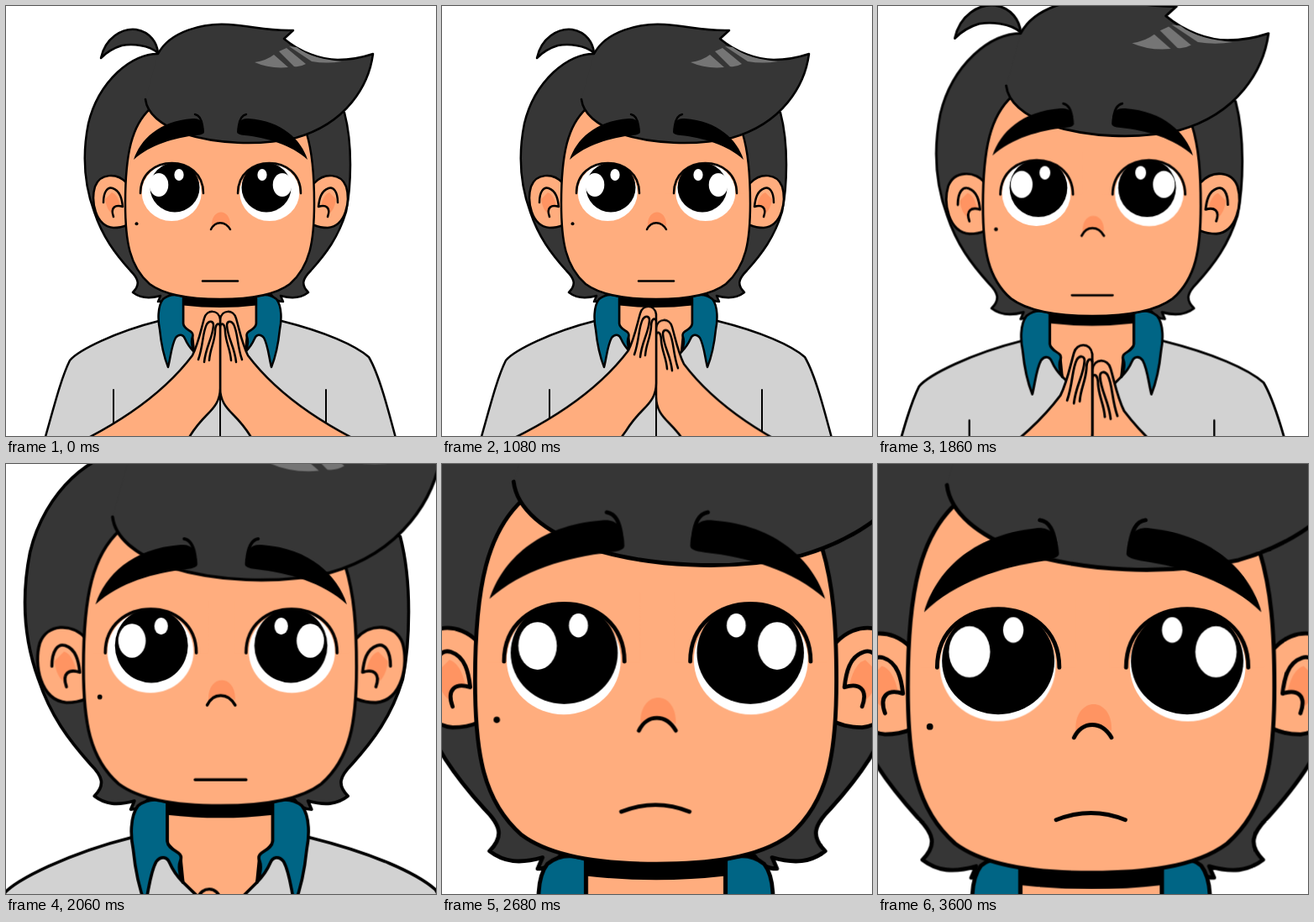
An HTML page without scripts for the animation above (3.62 s loop, 512 px wide and 512 px high).

```html
<!DOCTYPE html>
<html lang="en">
<head>
<meta charset="utf-8">
<title>Pleading</title>
<style>
html, body { margin: 0; width: 100%; height: 100%; overflow: hidden; background: #fff; }
svg { display: block; width: 100%; height: 100%; }
.ink { stroke: #000; stroke-width: 2.5; stroke-linecap: round; stroke-linejoin: round; }
.line { fill: none; }
.skin { fill: #ffad7e; }
.blush { fill: #ff9462; }
.hair { fill: #363636; }
.shirt { fill: #d2d2d2; }
.teal { fill: #006585; }
.shine { fill: #757575; }
.white { fill: #fff; }

.zoom, .nod, .lid, .lash, .brow, .pupil, .glint, .mouth, .rub, .drop {
  animation: 3620ms ease-in-out infinite;
}
.zoom { animation-name: zoom; }
.nod { animation-name: nod; }
.lid { animation-name: lid; }
.lash { animation-name: lash; }
.brow { animation-name: brow; transform-origin: 152px 183px; }
.pupil { animation-name: pupil; transform-origin: 201px 216px; }
.glint { animation-name: glint; transform-origin: 200px 210px; }
.mouth { animation-name: mouth; }
.rub { animation-name: rub; }
.drop { animation-name: drop; }
.left { --rub: -14px; }
.right { --rub: 24px; }

@keyframes zoom {
  0%, 45.3% { transform: translate(0, 0) scale(1); animation-timing-function: ease-in; }
  56.9% { transform: translate(-112.5px, -97px) scale(1.443); animation-timing-function: ease-out; }
  70.2% { transform: translate(-231px, -190px) scale(1.908); animation-timing-function: linear; }
  99.4%, 100% { transform: translate(-240px, -199px) scale(1.94); }
}
@keyframes nod {
  0%, 15.4%, 29.8%, 53%, 74% { transform: translateY(0); }
  7%, 40%, 43.8% { transform: translateY(5px); }
  92%, 100% { transform: translateY(4.5px); }
}
/* The lid is the skin above the eye opening, the lash its lower edge. */
@keyframes lid {
  0%, 18.8%, 29.8%, 53%, 100% { d: path("M150 223L160 223C160 175 235 175 235 223L245 223L245 180L150 180Z"); }
  8.8%, 40%, 43.8% { d: path("M150 230L160 230C171 194 224 194 235 230L245 230L245 180L150 180Z"); }
}
@keyframes lash {
  0%, 18.8%, 29.8%, 53%, 100% { d: path("M160 223C160 175 235 175 235 223"); }
  8.8%, 40%, 43.8% { d: path("M160 230C171 194 224 194 235 230"); }
}
@keyframes brow {
  0%, 18.8%, 29.8%, 53% { transform: translate(0, 0) rotate(0deg); }
  8.8%, 40%, 43.8% { transform: translate(-1px, 4px) rotate(3deg); }
  74% { transform: translate(-1px, 1px) rotate(0deg); }
  92%, 100% { transform: translate(0, 6px) rotate(-2deg); }
}
@keyframes pupil {
  0%, 45.3% { transform: translate(0, 0) scale(1, 1); }
  56.9% { transform: translate(-3px, 1px) scale(1.02, 1.04); }
  74% { transform: translate(-3.5px, 1.5px) scale(1.13, 1.08); }
  99.4%, 100% { transform: translate(-3.5px, 3px) scale(1.17, 1.11); }
}
@keyframes glint {
  0%, 56.9% { transform: scale(1); }
  74% { transform: scale(1.06); }
  99.4%, 100% { transform: scale(1.12); }
}
@keyframes mouth {
  0%, 56.9% { d: path("M234 327.5Q255 327.5 276 327.5"); }
  71%, 100% { d: path("M233 316.5Q254.5 308 275.5 316.5"); }
}
@keyframes rub {
  0%, 10.77%, 21.55%, 32.32%, 43.09%, 53.87%, 100% { transform: translateY(0); }
  5.39%, 16.16%, 26.93%, 37.71%, 48.48%, 59.25% { transform: translateY(var(--rub)); }
}
@keyframes drop {
  0%, 45.3% { transform: translateY(0); animation-timing-function: ease-in; }
  56.9% { transform: translateY(62px); animation-timing-function: linear; }
  66%, 100% { transform: translateY(190px); }
}
</style>
</head>
<body>
<svg viewBox="0 0 512 512" preserveAspectRatio="none">
  <defs>
    <ellipse id="eyeball" class="white" cx="197.2" cy="222" rx="35.500" ry="34"/>

    <g id="glints" class="white">
      <ellipse cx="182" cy="213" rx="11.3" ry="14"/>
      <ellipse cx="206" cy="201" rx="5.6" ry="7"/>
    </g>

    <g id="eyebrow">
      <path d="M152 183C160 159 182 137 222 134C231 133 236 138 236 150Q236 153 227 154C200 157 172 165 152 183Z"/>
      <path class="ink line" d="M225 129C231 130 233 136 234 143"/>
    </g>

    <g id="ear">
      <path class="ink skin" d="M144 211C132 198 112 199 106 215C101 232 106 262 128 264Q137 264 144 261"/>
      <path class="blush" d="M118 230Q120 243 126 247Q125 239 136 238Q133 224 126 222Z"/>
      <path class="ink line" d="M116 234C116 221 121 215 127 217C136 220 138 230 139 239C130 236 124 240 128 251"/>
    </g>

    <path id="collar" class="ink teal" d="M187 349C180 358 181 375 183 385C185 405 189 420 193 430C196 418 197 404 202 395C206 390 211 391 213 396C216 403 220 408 224 412C221 405 220 399 222 394C225 386 212 387 211 378V346C200 342 192 345 187 349Z"/>

    <g id="hand" class="ink">
      <path class="skin" d="M40 541C125 506 185 465 222 416C229 402 232 386 236 372C239 361 253 361 255 373V455C255 470 248 478 240 486C232 494 224 504 219 512L198 541Z"/>
      <path class="line" d="M229 421C235 404 234 388 239 379C242 374 247 375 247 380C246 396 238 405 236 424M242 422C243 408 248 402 249 388C249 379 253 376 255 381"/>
    </g>
  </defs>

  <g class="zoom">
    <g class="ink">
      <path class="shirt" d="M40 537C54 490 64 446 76 422C86 410 130 388 182 375H328C380 388 416 404 432 418C445 440 456 484 470 537Z"/>
      <path class="line" stroke-width="2" d="M128 457V530M381 457V530M255 440V530"/>
      <path class="skin" d="M211 335V380L222 392L224 412L255 442L285 412L287 392L298 380V335Z"/>
    </g>

    <g class="nod">
      <path class="ink hair" d="M183 57C150 55 110 90 98 140C90 180 94 215 105 245C115 275 130 295 148 315C158 325 160 332 151 341C160 348 170 349 184 345L181 352Q190 352 195 344H316Q321 352 330 352L327 345C341 349 351 348 360 341C351 332 353 325 363 315C381 295 396 275 405 245C411 215 413 165 403 127L250 60Z"/>
      <path d="M211 342H298V356.500Q255 361.500 211 356.500Z"/>
    </g>

    <use href="#collar"/>
    <use href="#collar" transform="matrix(-1 0 0 1 509 0)"/>

    <g class="nod">
      <use href="#ear"/>
      <use href="#ear" transform="matrix(-1 0 0 1 511 0)"/>
      <path class="ink skin" d="M172 122C150 142 142 175 142 235C142 280 147 310 171 331C191 346 225 349 255 349C285 349 318 346 338 331C362 310 367 280 367 235C367 200 365 175 358 152L250 100Z"/>

      <path class="ink hair" d="M113 62C118 38 138 26 155 28C172 31 180 44 181 56C170 46 150 45 138 47C128 50 120 55 113 62Z"/>
      <path class="ink hair" d="M181 57C195 30 235 20 265 22C295 24 310 30 342 29L331 39C350 55 375 64 395 64C410 64 425 61 437 57C432 95 405 140 345 157C300 167 250 164 212 152C185 142 168 128 166 111"/>
      <path class="shine" d="M296 67Q310 65 319 58L336 73Q314 75 296 67ZM325 54L334 50L357 69Q350 73 343 72ZM337 48L346 49C360 60 380 64 400 66Q382 69 364 66Z"/>

      <g>
        <use href="#eyeball"/>
        <circle class="pupil" cx="201" cy="216" r="29.500"/>
        <g class="glint"><use href="#glints"/></g>
        <path class="lid skin" d="M150 223L160 223C160 175 235 175 235 223L245 223L245 180L150 180Z"/>
        <path class="lash ink line" d="M160 223C160 175 235 175 235 223"/>
        <g class="brow"><use href="#eyebrow"/></g>
      </g>
      <g transform="matrix(-1 0 0 1 511 0)">
        <use href="#eyeball"/>
        <circle class="pupil" cx="201" cy="216" r="29.500"/>
        <g class="glint"><use href="#glints"/></g>
        <path class="lid skin" d="M150 223L160 223C160 175 235 175 235 223L245 223L245 180L150 180Z"/>
        <path class="lash ink line" d="M160 223C160 175 235 175 235 223"/>
        <g class="brow"><use href="#eyebrow"/></g>
      </g>

      <circle cx="155.500" cy="259.300" r="2"/>
      <path class="blush" d="M245 262C244 240 268 240 267 262Q256 253 245 262Z"/>
      <path class="ink line" stroke-width="3" d="M244 266C249 255.500 261 255.500 267 266"/>
      <path class="mouth ink line" d="M234 327.500Q255 327.500 276 327.500"/>
    </g>

    <g class="drop">
      <g class="rub right"><use href="#hand" transform="matrix(-1 0 0 1 510 0)"/></g>
      <g class="rub left"><use href="#hand"/></g>
    </g>
  </g>
</svg>
</body>
</html>
```
